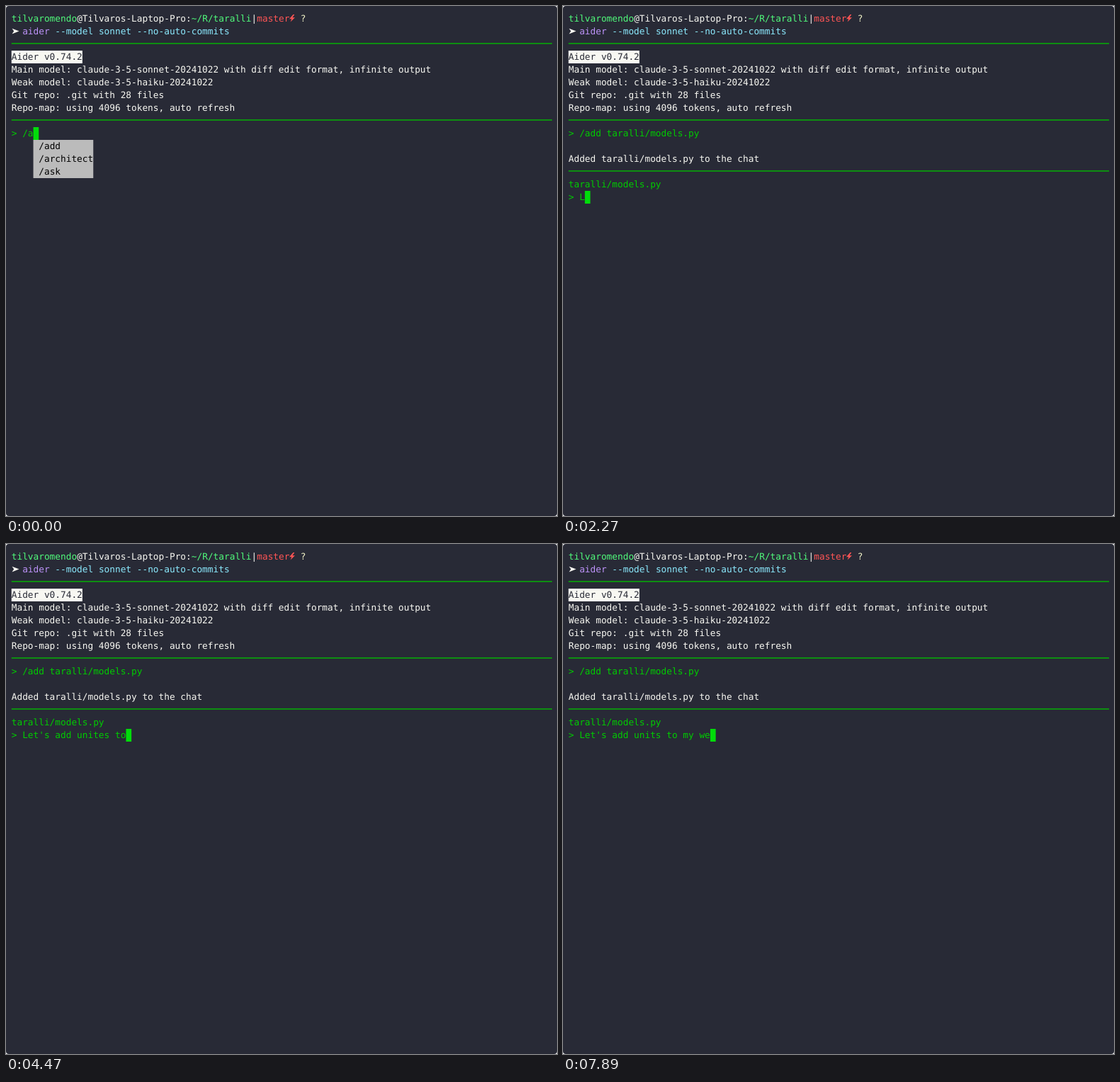
Recreate the animation shown at these times as an HTML page. Size 778 by 720 pixels, loop 8000 ms.

```html
<!DOCTYPE html>
<html lang="en">
<head>
<meta charset="utf-8">
<title>Terminal session</title>
<style>
  html, body { margin: 0; width: 100%; height: 100%; overflow: hidden; background: #fff; }
  svg { display: block; width: 778px; height: 720px; }
  text {
    font: 12.79px "DejaVu Sans Mono", monospace;
    white-space: pre;
    text-rendering: geometricPrecision;
    font-variant-ligatures: none;
  }
</style>
</head>
<body>
<svg viewBox="0 0 778 720">
  <rect width="778" height="720" rx="4" fill="#282a36"/>
  <g id="head"></g>
  <g id="live"></g>
</svg>
<script>
const LOOP = 8000, CW = 7.7, RH = 18, LEFT = 7.75, TOP = 9;
const WHITE = '#f8f8f2', GREEN = '#00cc00', LIME = '#50fa7b', CYAN = '#8be9fd';

const colX = c => LEFT + c * CW;
const rowY = r => TOP + r * RH;
const escapeText = s => s.replace(/&/g, '&amp;').replace(/</g, '&lt;');

const text = (col, row, s, fill = WHITE) =>
  `<text x="${colX(col)}" y="${rowY(row) + 13}" fill="${fill}">${escapeText(s)}</text>`;
const block = (col, row, w, h, fill) =>
  `<rect x="${colX(col)}" y="${rowY(row)}" width="${w * CW}" height="${h * RH}" fill="${fill}"/>`;
const rule = row =>
  `<rect x="${LEFT}" y="${rowY(row) + 7.2}" width="763.3" height="1.5" fill="#05b005"/>`;

// Consecutive coloured pieces on one row
function spans(col, row, parts) {
  return parts.map(([s, fill]) => {
    const out = text(col, row, s, fill);
    col += s.length;
    return out;
  }).join('');
}

const head =
  spans(0, 0, [['tilvaromendo', LIME], ['@Tilvaros-Laptop-Pro:', WHITE],
    ['~/R/taralli', LIME], ['|', WHITE], ['master', '#ff5555']]) +
  '<path d="M405.5 12L400 18.2H403.3L401.6 22.6L408 16.2H404.4L407.4 12Z" fill="#ff5555"/>' +
  text(53, 0, '?', '#f1f3c8') +
  '<path d="M8.5 31.8L18.5 35.6L8.5 39.4L11.2 35.6Z" fill="#f8f8f2"/>' +
  spans(2, 1, [['aider', '#bd93f9'], [' --model sonnet --no-auto-commits', CYAN]]) +
  rule(2) +
  block(0, 3, 13, 1, WHITE) + text(0, 3, 'Aider v0.74.2', '#282a36') +
  text(0, 4, 'Main model: claude-3-5-sonnet-20241022 with diff edit format, infinite output') +
  text(0, 5, 'Weak model: claude-3-5-haiku-20241022') +
  text(0, 6, 'Git repo: .git with 28 files') +
  text(0, 7, 'Repo-map: using 4096 tokens, auto refresh') +
  rule(8);

const MODELS = 'taralli/models.py';
const pages = ['base', 'home', 'index', 'layout', 'meals'].map(p => `taralli/templates/${p}.html`);
const menus = {
  a: ['/add', '/architect', '/ask'],
  ad: ['/add'],
  files: ['Makefile', 'README.md', 'docker-compose.yml', 'pyproject.toml',
    'taralli/main.py', 'taralli/metrics.py', MODELS, ...pages],
  models: [MODELS],
  wordA: ['amount', 'at', 'average_nutrients_per_day_tracked'],
  wordU: ['update_daily_nutrition_averages', 'url', 'user_id'],
  wordT: ['taralli/__init__.py', 'taralli/config.py', 'taralli/main.py', 'taralli/metrics.py',
    MODELS, ...pages, 'target', 'text', 'time', 'timestamp', 'type'],
  wordM: ['max_length', 'maximum_daily_protein', 'meal'],
  wordW: ['weight', 'weight_measurement_created_at']
};

// [start ms, typed text, open menu]
const addSteps = [
  [0, '/a', 'a'], [140, '/ad', 'ad'], [290, '/add'], [370, '/add '],
  [450, '/add m', 'files'], [520, '/add mo', 'models'], [600, '/add mod', 'models'],
  [660, '/add mode', 'models'], [730, '/add model', 'models'], [1070, '/add ' + MODELS]
];
const ENTER = 1510, REPLY = 1550;
const A = "Let's add ", B = A + 'units to ';
const askSteps = [
  [REPLY, ''], [2270, 'L'], [2380, 'Le'], [2430, 'Let'], [2480, "Let'"],
  [2660, "Let's"], [2730, "Let's "], [2880, "Let's a", 'wordA'],
  [3250, "Let's ad"], [3330, "Let's add"], [3420, A],
  [3620, A + 'u', 'wordU'], [3690, A + 'un'],
  [3840, A + 'uni'], [3930, A + 'unit'], [4030, A + 'unite'], [4130, A + 'unites'],
  [4240, A + 'unites '], [4350, A + 'unites t', 'wordT'], [4470, A + 'unites to'],
  [4520, A + 'unites to '], [4680, A + 'unites to'],
  [4860, A + 'unites t'], [4950, A + 'unites '], [5040, A + 'unites'],
  [5130, A + 'unite'], [5220, A + 'unit'],
  [5360, A + 'units'], [5450, A + 'units '], [5540, A + 'units t', 'wordT'],
  [5630, A + 'units to'], [5720, B], [5820, B + 'm', 'wordM'], [6040, B + 'my '],
  [6390, B + 'my w', 'wordW'], [6980, B + 'my wr'], [7330, B + 'my w'],
  [7470, B + 'my wei'], [7890, B + 'my we']
];

function menu(col, row, items, bg = '#bbbbbb', fg = '#000') {
  const width = 1 + Math.max(...items.map(s => s.length));
  return block(col, row, width, items.length, bg) +
    items.map((s, i) => text(col + 1, row + i, s, fg)).join('');
}

const cursor = (col, row) => block(col, row, 1, 1, '#00dc0a');

function promptLine(row, typed, name) {
  const col = typed.length + 2;
  return text(0, row, '> ' + typed, GREEN) + cursor(col, row) +
    (name ? menu(col, row + 1, menus[name]) : '');
}

const stepAt = (steps, t) => steps.filter(s => s[0] <= t).pop();

function scene(t) {
  if (t < ENTER) {
    const [at, typed, name] = stepAt(addSteps, t);
    const picked = at === 1070 ? menu(12, 10, [MODELS], '#888888', '#fff') : '';
    return promptLine(9, typed, name) + picked;
  }
  const sent = text(0, 9, `> /add ${MODELS}`, GREEN);
  if (t < REPLY) return sent + cursor(0, 10);
  const [, typed, name] = stepAt(askSteps, t);
  return sent + text(0, 11, `Added ${MODELS} to the chat`) + rule(12) +
    text(0, 13, MODELS, GREEN) + promptLine(14, typed, name);
}

document.getElementById('head').innerHTML = head;
const live = document.getElementById('live');
const start = performance.now();
let shown = '';

function draw(now) {
  const next = scene(Math.max(0, now - start) % LOOP);
  if (next !== shown) live.innerHTML = shown = next;
  requestAnimationFrame(draw);
}
draw(start);
</script>
</body>
</html>
```
